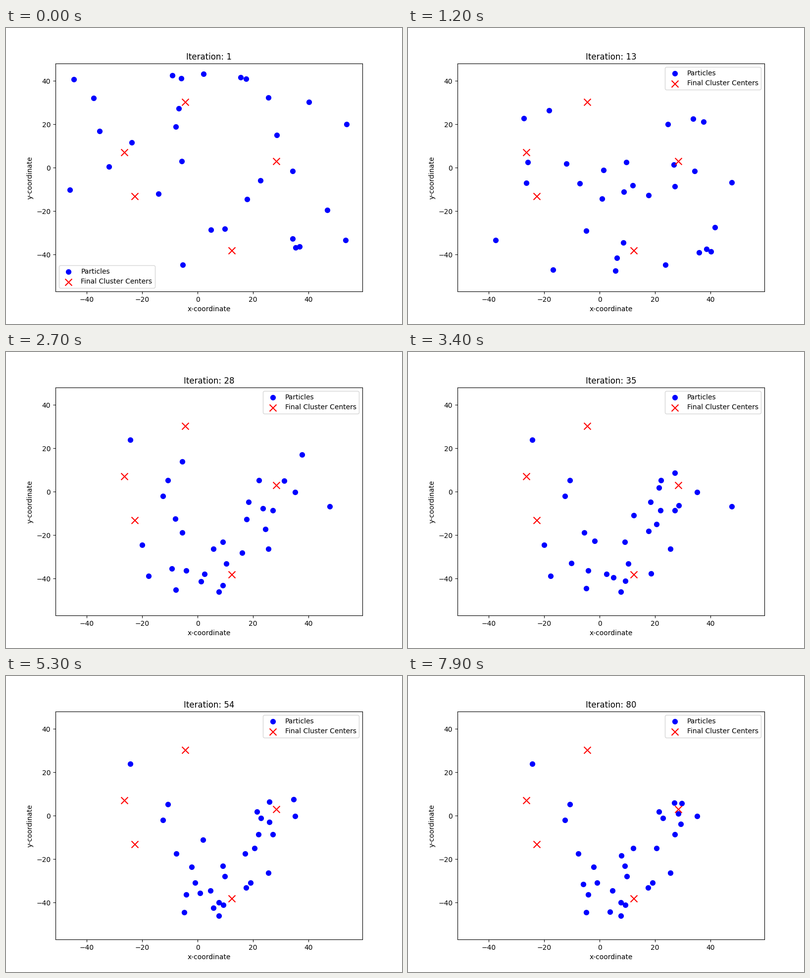
Recreate the animation shown at these times as a matplotlib script. Size 800 px wide and 600 px high, loop 8 s.

```python
import matplotlib.pyplot as plt
import numpy as np
from matplotlib.animation import FuncAnimation

FRAMES, INTERVAL = 80, 100
COUNT = 30
XLIM, YLIM = (-51.35, 59.57), (-57, 48)
WALL_LO, WALL_HI = (-46.2, -52), (54.6, 47.4)
LEGEND_SWITCH = 4

CENTERS = [(-26.4, 7.1), (-22.7, -13.1), (-4.4, 30.3), (12.4, -38.1), (28.5, 3)]

# Rest points of the first particles to settle, in order of settling.
ANCHORS = [(-24.3, 23.9), (35.3, -0.1), (25.5, -26.3), (-4.1, -36.3),
           (7.7, -46), (21.5, 1.9), (9.3, -41), (-4.8, -44.5)]
SETTLE = np.linspace(16, 34, len(ANCHORS)).astype(int)

# Where the others gather: middle, spread, share.
GROUPS = [((8.6, -32), (8, 9), 16), ((31, 4), (3, 5), 5), ((-24, 17), (2, 2), 1)]


def scatter_in_box(rng, n, margin=0):
    lo, hi = np.array(WALL_LO) - margin, np.array(WALL_HI) + margin
    return np.clip(rng.uniform(lo, hi, (n, 2)), WALL_LO, WALL_HI)


def simulate(seed):
    """Cooling random jumps: rarer and closer to home as time goes on."""
    rng = np.random.default_rng(seed)
    homes = np.vstack([ANCHORS] + [rng.normal(mid, spread, (n, 2))
                                   for mid, spread, n in GROUPS])
    settle = np.full(COUNT, FRAMES)
    settle[:len(ANCHORS)] = SETTLE

    path = [scatter_in_box(rng, COUNT)]
    for t in range(1, FRAMES):
        heat = np.exp(-t / 25)
        jumps = rng.random(COUNT) < 0.22 * np.exp(-t / 30)
        spots = homes + heat * (scatter_in_box(rng, COUNT, 4) - homes)
        pos = np.where(jumps[:, None], spots, path[-1])
        pos = np.where((t >= settle)[:, None], homes, pos)
        path.append(np.clip(pos, WALL_LO, WALL_HI))
    return path


path = simulate(seed=5)

fig, ax = plt.subplots(figsize=(8, 6), dpi=100)
dots = ax.scatter(*path[0].T, s=50, c="blue", label="Particles")
ax.scatter(*np.transpose(CENTERS), s=100, c="red", marker="x",
           label="Final Cluster Centers")
ax.set(xlim=XLIM, ylim=YLIM, xlabel="x-coordinate", ylabel="y-coordinate")


def update(i):
    dots.set_offsets(path[i])
    ax.set_title(f"Iteration: {i + 1}")
    ax.legend(loc="lower left" if i < LEGEND_SWITCH else "upper right")
    return []


anim = FuncAnimation(fig, update, frames=FRAMES, interval=INTERVAL,
                     repeat=True, repeat_delay=0)
plt.show()
```
